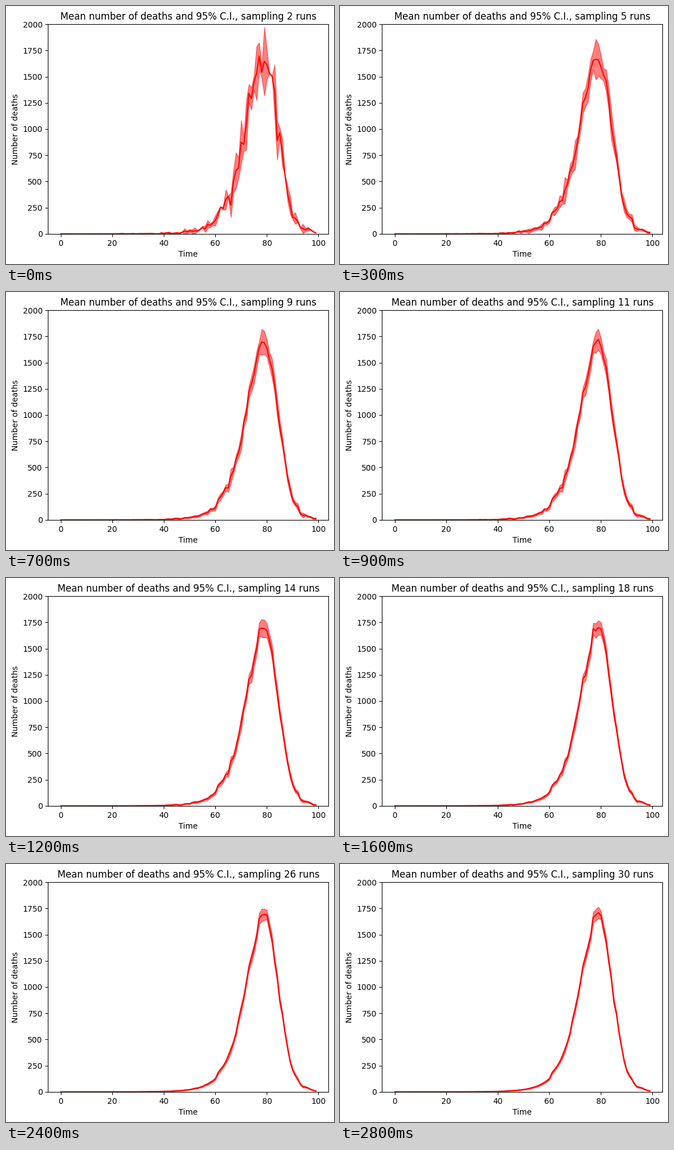
These frames come from a looping animation (580 by 455 pixels, 2.9 s). A matplotlib script:

```python
import matplotlib.pyplot as plt
import numpy as np
from matplotlib.animation import FuncAnimation

W, H, DPI = 580, 455, 100
FIRST_RUNS, LAST_RUNS = 2, 30
RED = "red"
t = np.arange(100)

# Long-run mean: exponential growth and decay between a few (time, deaths) knots.
KNOTS = [
    (0, 0.005), (50, 22), (60, 125), (61, 180), (64, 285), (68, 560),
    (69, 690), (73, 1195), (76, 1480), (77, 1665), (79, 1710), (80, 1685),
    (82, 1440), (84, 1090), (85, 865), (86, 750), (88, 430), (90, 205),
    (92, 120), (94, 48), (96, 37), (99, 9),
]
knot_t, knot_y = np.array(KNOTS).T
expected = np.exp(np.interp(t, knot_t, np.log(knot_y)))


def simulate_runs():
    """Runs scattered around the expected curve, centred on it as a whole."""
    rng = np.random.default_rng(4)
    noise = rng.normal(size=(LAST_RUNS, t.size))
    noise -= noise.mean(axis=0)
    return np.maximum(expected + 3 * np.sqrt(expected) * noise, 0)


def mean_and_interval(sample):
    """Mean and half-width of its 95% confidence interval."""
    error = sample.std(axis=0, ddof=1) / np.sqrt(len(sample))
    return sample.mean(axis=0), 1.96 * error


def band_outline(mean, width):
    lower = np.column_stack([t, mean - width])
    upper = np.column_stack([t, mean + width])
    return np.vstack([lower, upper[::-1]])


runs = simulate_runs()

fig = plt.figure(figsize=(W / DPI, H / DPI), dpi=DPI, facecolor="white")
ax = fig.add_axes([74.4 / W, 53.2 / H, 496 / W, 369.6 / H])
ax.set_xlim(-4.95, 103.95)
ax.set_ylim(0, 2000)
ax.set_xlabel("Time")
ax.set_ylabel("Number of deaths")
title = ax.set_title("")
band = ax.fill_between(t, t * 0, t * 0, color=RED, alpha=0.5)
line, = ax.plot(t, t * 0, color=RED)


def draw(frame):
    count = FIRST_RUNS + frame
    mean, width = mean_and_interval(runs[:count])
    line.set_ydata(mean)
    band.set_verts([band_outline(mean, width)])
    title.set_text(f"Mean number of deaths and 95% C.I., sampling {count} runs")
    return line, band, title


anim = FuncAnimation(fig, draw, frames=LAST_RUNS - FIRST_RUNS + 1,
                     interval=100, repeat=True, repeat_delay=0)
plt.show()
```
